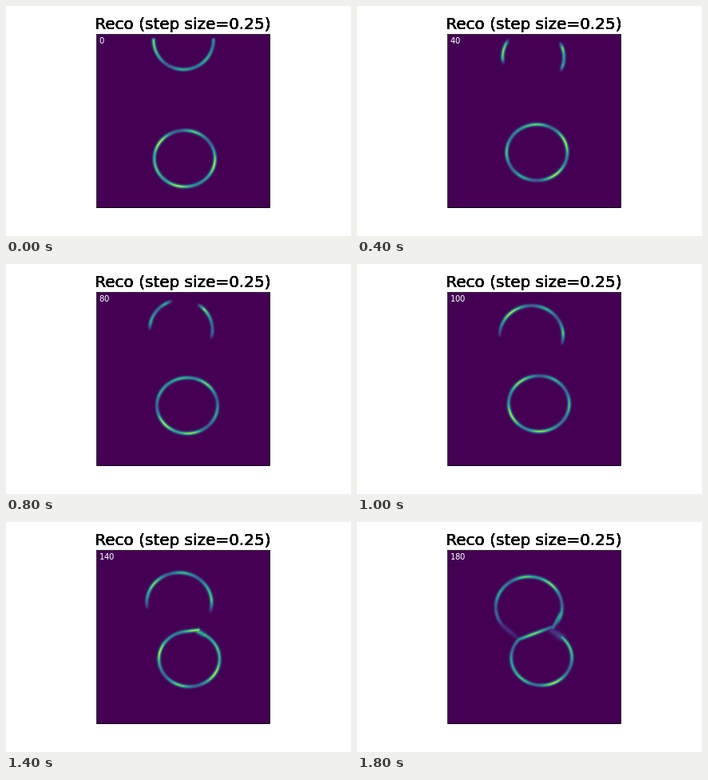
These frames come from a looping animation (432 by 288 pixels, 2000 ms). An HTML page with a canvas:

```html
<!DOCTYPE html>
<html lang="en">
<head>
<meta charset="utf-8">
<title>Reco</title>
<style>
  html, body { margin: 0; width: 100%; height: 100%; overflow: hidden; background: #fff; }
  canvas, svg { position: absolute; left: 0; top: 0; width: 432px; height: 288px; }
  text { font-family: "DejaVu Sans", sans-serif; }
</style>
</head>
<body>
<canvas id="view" width="432" height="288"></canvas>
<svg viewBox="0 0 432 288">
  <filter id="dense" color-interpolation-filters="sRGB">
    <feComponentTransfer><feFuncA type="linear" slope="4"/></feComponentTransfer>
  </filter>
  <text x="221.4" y="29" font-size="20" text-anchor="middle" filter="url(#dense)">Reco (step size=0.25)</text>
  <text id="count" x="117" y="47" font-size="10" letter-spacing="-.36" fill="#fff">0</text>
</svg>
<script>
const LEFT = 114, TOP = 36, W = 216, H = 217, STEP = 200, STEPS = 10;
const viridis = ["440154", "472d7b", "3b528b", "2c728e", "21918c", "28ae80", "5ec962", "addc30", "fde725"]
  .map(h => [0, 2, 4].map(i => parseInt(h.slice(i, i + 2), 16)));

const clamp = (v, lo = 0, hi = 1) => Math.min(Math.max(v, lo), hi);
const mix = (a, b, t) => a + (b - a) * t;

function shade(v) {
  const x = clamp(v, 0, 0.9999) * (viridis.length - 1), i = Math.floor(x);
  return viridis[i].map((c, j) => mix(c, viridis[i + 1][j], x - i));
}

// Angles in degrees, clockwise from the right.
const ellipse = (cx, cy, rx, ry) => deg => {
  const a = deg * Math.PI / 180;
  return [cx + rx * Math.cos(a), cy + ry * Math.sin(a)];
};

const arc = (oval, from, to, fade = 0) => ({ at: u => oval(mix(from, to, u)), fade, level: 1, sigma: 1.35 });

const path = (points, level = 1, sigma = 1.35) => ({
  at: u => {
    const x = u * (points.length - 1), i = Math.min(Math.floor(x), points.length - 2);
    return points[i].map((c, j) => mix(c, points[i + 1][j], x - i));
  },
  fade: 0, level, sigma
});

// The two rings drift together, slowing down, and join at a neck.
function scene(k) {
  const t = k / (STEPS - 1);
  const upper = ellipse(221.8 - 7 * t, 106 - 64 * (1 - t) ** 1.65, 37.5 + 4 * t, 37 + t);
  const lower = ellipse(223.2 + 7.4 * t, 169.5 + 21 * (1 - t) ** 1.8, 38, 35.2 - 0.7 * t);

  const open = clamp(1 - k / 5) ** 4, close = clamp((k - 5) / 4);
  const left = 180 - 90 * open - 37 * close ** 2;
  const right = 376 + 74 * open + 28 * close ** 6;
  const strokes = k < 5
    ? [arc(upper, left, 180 + 18 * k, 0.2 * Math.min(k, 1)), arc(upper, right, 360 - 14 * k, 0.2 * Math.min(k, 1))]
    : [arc(upper, left, right, 0.12)];

  if (k < 6) return [...strokes, arc(lower, 0, 360)];

  const q = (k - 6) / 3, join = q ** 6;
  const from = -62 + 14 * q ** 2, to = 266 - 44 * q ** 3;
  const tip = [238 + 8 * q, 136.8 - 6.6 * q];
  return [
    ...strokes,
    arc(lower, from, to),
    path([lower(to), tip]),
    path([[tip[0] - 3 * q, tip[1] + 5 * q], lower(from)], 0.95 - 0.55 * q, 1.35 + 1.4 * q),
    path([upper(right - 35), upper(right), tip], join),
    path([upper(left), lower(to)], 0.14 * join, 2)
  ];
}

// Uneven brightness along the lines, different in each step.
const glow = (x, y, k) =>
  0.64 + 0.16 * Math.sin(0.16 * x + 0.05 * y + k) + 0.14 * Math.sin(0.15 * y - 0.06 * x + 2 * k);

function render(k) {
  const field = new Float32Array(W * H);
  for (const { at, fade, level, sigma } of scene(k)) {
    const reach = Math.ceil(sigma * 3.5);
    for (let i = 0; i <= 500; i++) {
      const u = i / 500, [px, py] = at(u);
      const end = fade ? clamp(0.12 + Math.min(u, 1 - u) / fade) : 1;
      const v = glow(px, py, k) * level * end, x = px - LEFT, y = py - TOP;
      for (let r = Math.max(0, Math.floor(y) - reach); r <= Math.min(H - 1, y + reach); r++) {
        for (let c = Math.max(0, Math.floor(x) - reach); c <= Math.min(W - 1, x + reach); c++) {
          const d2 = (c - x) ** 2 + (r - y) ** 2;
          field[r * W + c] = Math.max(field[r * W + c], v * Math.exp(-d2 / (2 * sigma ** 2)));
        }
      }
    }
  }
  const img = new ImageData(W, H);
  field.forEach((v, i) => img.data.set([...shade(v), 255], i * 4));
  return img;
}

const ctx = document.getElementById("view").getContext("2d");
const count = document.getElementById("count");
const images = Array.from({ length: STEPS }, (_, k) => render(k));
ctx.lineWidth = 0.8;
let shown = -1;

function draw(k) {
  ctx.clearRect(0, 0, 432, 288);
  ctx.putImageData(images[k], LEFT, TOP);
  ctx.strokeRect(LEFT - 0.5, TOP - 0.5, W + 1, H);
  count.textContent = k * 20;
  shown = k;
}

const start = performance.now();
function tick() {
  const k = Math.floor((performance.now() - start) / STEP) % STEPS;
  if (k !== shown) draw(k);
  requestAnimationFrame(tick);
}
tick();
</script>
</body>
</html>
```
